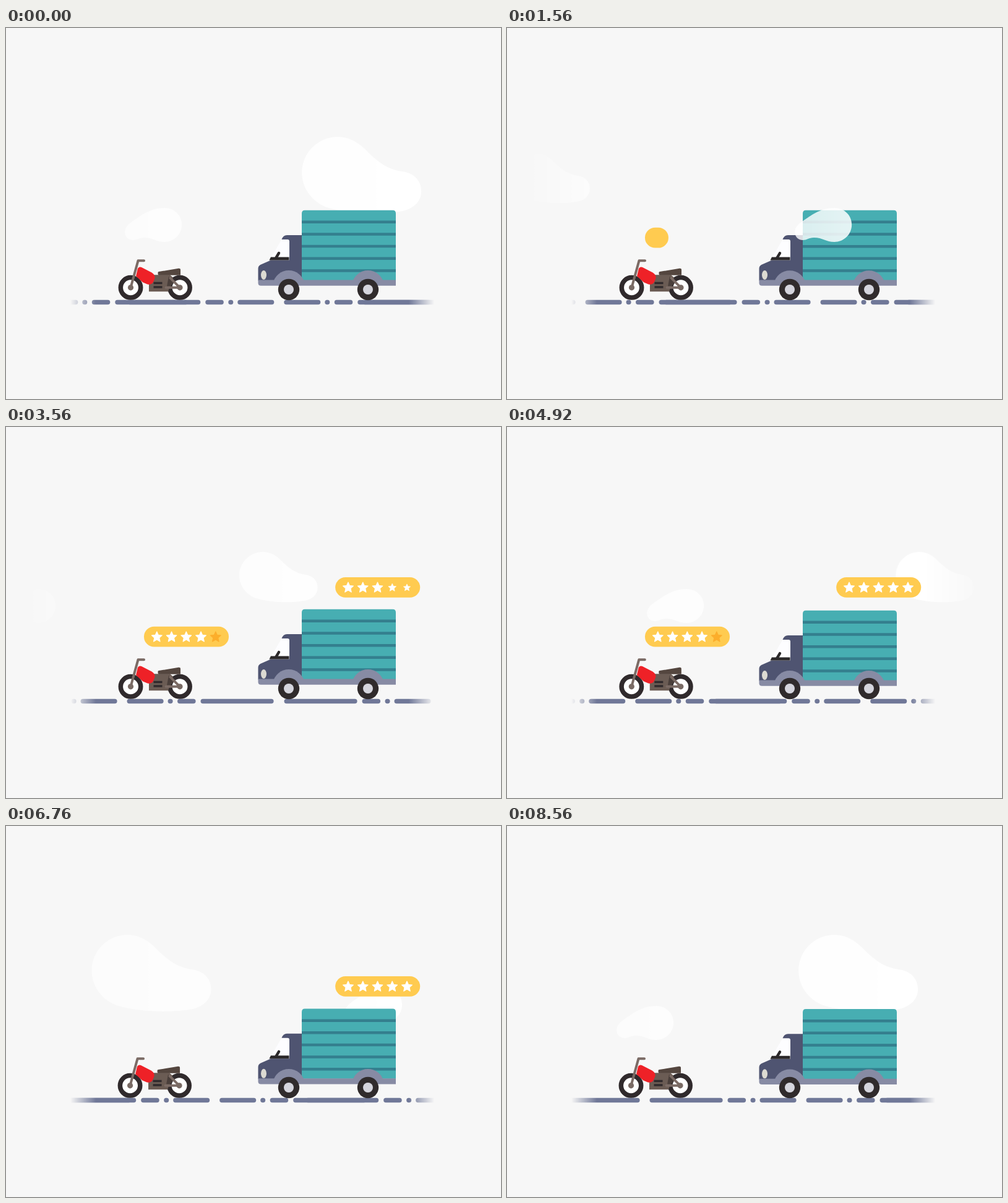
Animation of 800 by 600 pixels, one loop 8.6 s. Source, as an HTML page:

```html
<!DOCTYPE html>
<html lang="en">
<head>
<meta charset="utf-8">
<title>Deliveries</title>
<style>
html, body { margin: 0; width: 100%; height: 100%; overflow: hidden; background: #f7f7f7; }
svg { display: block; width: 800px; height: 600px; }
</style>
</head>
<body>
<svg viewBox="0 0 800 600">
  <defs>
    <linearGradient id="skyFade" gradientUnits="userSpaceOnUse" x1="0" x2="800" y1="0" y2="0">
      <stop offset=".03" stop-color="#fff" stop-opacity="0"/>
      <stop offset=".17" stop-color="#fff" stop-opacity=".62"/>
      <stop offset=".6" stop-color="#fff" stop-opacity=".8"/>
      <stop offset=".84" stop-color="#fff" stop-opacity=".95"/>
      <stop offset=".97" stop-color="#fff" stop-opacity="0"/>
    </linearGradient>
    <linearGradient id="roadFade" gradientUnits="userSpaceOnUse" x1="104" x2="692" y1="0" y2="0">
      <stop offset="0" stop-color="#fff" stop-opacity="0"/>
      <stop offset=".07" stop-color="#fff"/>
      <stop offset=".93" stop-color="#fff"/>
      <stop offset="1" stop-color="#fff" stop-opacity="0"/>
    </linearGradient>
    <mask id="skyMask" maskUnits="userSpaceOnUse" x="0" y="0" width="800" height="600">
      <rect width="800" height="600" fill="url(#skyFade)"/>
    </mask>
    <mask id="roadMask" maskUnits="userSpaceOnUse" x="0" y="0" width="800" height="600">
      <rect width="800" height="600" fill="url(#roadFade)"/>
    </mask>
    <path id="big" d="M58 0C82 0 98 15 110 28C125 42 140 53 162 56C180 58 193 70 193 88C193 105 180 116 163 120C130 126 80 126 40 114C15 104 0 82 0 58C0 26 26 0 58 0Z"/>
    <path id="small" d="M64 0C80 0 92 12 92 27C92 43 79 55 64 55C50 55 45 48 31 48C22 48 20 52 13 52C5 52 0 46 0 39C0 30 8 24 16 19C28 11 42 0 64 0Z"/>
    <g id="wheel"><circle r="17.2" fill="#302b2c"/><circle r="8" fill="#d5d5dd"/></g>
    <g id="tyre"><circle r="16.2" fill="#fff" stroke="#302a2c" stroke-width="7.5"/></g>
    <path id="arch" d="M-25.5 10V8A26 26 0 0 1 25.5 8V10Z" fill="#878ba4"/>
  </defs>

  <g id="backSky" fill="#fff" mask="url(#skyMask)"></g>

  <g mask="url(#roadMask)"><g id="road" fill="#707898"></g></g>

  <g id="bike">
    <use href="#tyre" x="201.5" y="420"/>
    <use href="#tyre" x="281" y="420"/>
    <path d="M231 399.5H265L270 404L262 426.5H231Z" fill="#6b5c54"/>
    <path d="M263 402L272 411L266 418H260Z" fill="#4a3f3b"/>
    <path d="M238.5 412.7h14M238.5 419.2h14" stroke="#302a2c" stroke-width="3.5"/>
    <path d="M247 394.3L279 389Q282 388.8 282 391V400H247.5Q245.5 400 245.5 397V396Q245.5 394.6 247 394.3Z" fill="#54463f"/>
    <path d="M219 387.2L235 395.5Q241.5 399 240.5 405L238 411Q235 416.5 228 414.5L221 411.5L210 401.5L213 389Q215.5 385.8 219 387.2Z" fill="#ee2127"/>
    <g fill="none" stroke="#7b6b65" stroke-width="4" stroke-linecap="round" stroke-linejoin="round">
      <path d="M201.5 420L213.5 376.5H223"/>
      <path d="M258.5 420H281L265.5 404.5"/>
    </g>
    <g fill="#796a64"><circle cx="201.5" cy="420" r="4.6"/><circle cx="281" cy="420" r="4.6"/></g>
  </g>

  <g id="truck">
    <path d="M445.5 342H458V375.5H426Z" fill="#fdfdff"/>
    <path d="M478 335H454Q448 335 445.5 342H455Q458 342 458 345V375.5H428L411 383Q407.5 385 407.5 389V408.5H478Z" fill="#4f5471"/>
    <path d="M425.5 375.5L428 370.5H457.5V375.5Z" fill="#2b2829"/>
    <path d="M436.5 371.5L441 364" stroke="#2b2829" stroke-width="4.4" stroke-linecap="round"/>
    <path d="M478 408V300Q478 294.7 483 294.7H625Q630 294.7 630 300V408Z" fill="#47aeb2"/>
    <path id="stripes" stroke="#347f8e" stroke-width="4.5"/>
    <path d="M407.5 407.5H630V416.7H412Q407.5 416.7 407.5 412.5Z" fill="#878ba4"/>
    <use href="#arch" x="457" y="405"/>
    <use href="#arch" x="585" y="405"/>
    <ellipse cx="416.5" cy="399.5" rx="4.5" ry="7.5" fill="#dcdad2"/>
  </g>
  <use href="#wheel" x="457" y="423"/>
  <use href="#wheel" x="585" y="423"/>

  <g id="badges"></g>
  <g id="frontSky" fill="#fff" mask="url(#skyMask)"></g>
</svg>
<script>
const LOOP = 8600;
const $ = id => document.getElementById(id);
const clamp = v => Math.max(0, Math.min(1, v));
const ramp = (t, from, length) => clamp((t - from) / length);
const smooth = p => p * p * (3 - 2 * p);
const wave = (t, period) => (1 - Math.cos(2 * Math.PI * t / period)) / 2;

function add(parent, tag, attrs) {
  const el = document.createElementNS('http://www.w3.org/2000/svg', tag);
  for (const k in attrs) el.setAttribute(k, attrs[k]);
  return parent.appendChild(el);
}
const place = (el, x, y, scale = 1) =>
  el.setAttribute('transform', `translate(${x} ${y}) scale(${scale})`);

$('stripes').setAttribute('d', [0, 1, 2, 3, 4].map(i => `M478 ${313.8 + i * 19.65}h152`).join(''));

// Each cloud passes x at time t
const clouds = [
  { shape: 'big', x: 478, t: 0, y: 176, v: .1848 },
  { shape: 'big', x: 229, t: 2760, y: 202, v: .1848, scale: .656 },
  { shape: 'big', x: 138.3, t: 6760, y: 176, v: .1848 },
  { shape: 'small', x: -12, t: 3560, y: 262, v: .175 },
  { shape: 'small', x: 192, t: 0, y: 291, v: .175, front: true },
  { shape: 'small', x: 177, t: 8560, y: 291, v: .175, front: true }
];
for (const c of clouds) c.el = add($(c.front ? 'frontSky' : 'backSky'), 'use', { href: '#' + c.shape });

// Road: one strip of dashes, repeated at uneven distances
const dashes = [[0, 118], [126, 29.5], [163, 8], [178, 59], [253, 59], [319, 8], [334.5, 29.5], [372, 118]];
const strips = [576, 196, -196, -576, -1083, -1463, -1855, -2235, -2741];
for (const start of strips)
  for (const [x, width] of dashes)
    add($('road'), 'rect', { x: start + x, y: 439.8, width, height: 7.5, rx: 3.75 });

const starPath = 'M' + Array.from({ length: 10 }, (_, i) => {
  const r = i % 2 ? 4.3 : 9.1, a = i * Math.PI / 5;
  return (r * Math.sin(a)).toFixed(2) + ' ' + (-r * Math.cos(a)).toFixed(2);
}).join('L') + 'Z';

const badges = [
  { x: 223, y: 339.2, start: 1175, end: 5900, rating: 4 },
  { x: 532.2, y: 259.3, start: 2500, end: 7860, rating: 5 }
];
for (const b of badges) {
  b.el = add($('badges'), 'g', {});
  b.pill = add(b.el, 'rect', { x: -16.5, y: -16.4, height: 32.8, rx: 16.4, fill: '#ffcb50' });
  b.stars = [0, 1, 2, 3, 4].map(i => {
    const color = i < b.rating ? '#fff' : '#fcae2b';
    return add(b.el, 'path', { d: starPath, fill: color, stroke: color, 'stroke-width': 1, 'stroke-linejoin': 'round' });
  });
}

const starSize = t => .65 * smooth(ramp(t, 0, 260)) + .08 * ramp(t, 260, 100) + .27 * smooth(ramp(t, 360, 100));

function drawBadge(b, time) {
  const t = time - b.start, out = time - b.end;
  const pop = 1.06 * smooth(ramp(t, 0, 140)) - .06 * smooth(ramp(t, 140, 120));
  const scale = pop * (1 - smooth(ramp(out, 300, 180)));
  const rise = 5.2 * (1 - smooth(ramp(t, 270, 100)));
  const open = smooth(ramp(t, 340, 350)) * (1 - smooth(ramp(out, 0, 300)));
  b.el.style.display = scale > 0 ? '' : 'none';
  place(b.el, b.x + 16.5, b.y + rise, scale);
  b.pill.setAttribute('width', 33 + 104 * open);
  b.stars.forEach((star, i) => {
    const size = starSize(t - 375 - i * 106) * (1 - ramp(out, -60 + (4 - i) * 50, 80));
    place(star, 4.3 + i * 23.75, .6, size);
  });
}

function frame(now) {
  const t = now % LOOP;
  for (const c of clouds) place(c.el, c.x + c.v * (t - c.t), c.y, c.scale);
  place($('road'), .288 * t, 0);
  place($('truck'), 0, 2.3 * wave(t, 512));
  place($('bike'), -wave(t, 222.2), -.2);
  badges.forEach(b => drawBadge(b, t));
  requestAnimationFrame(frame);
}
const begin = performance.now();
const run = frame;
frame = now => run(Math.max(0, now - begin));
frame(begin);
</script>
</body>
</html>
```
